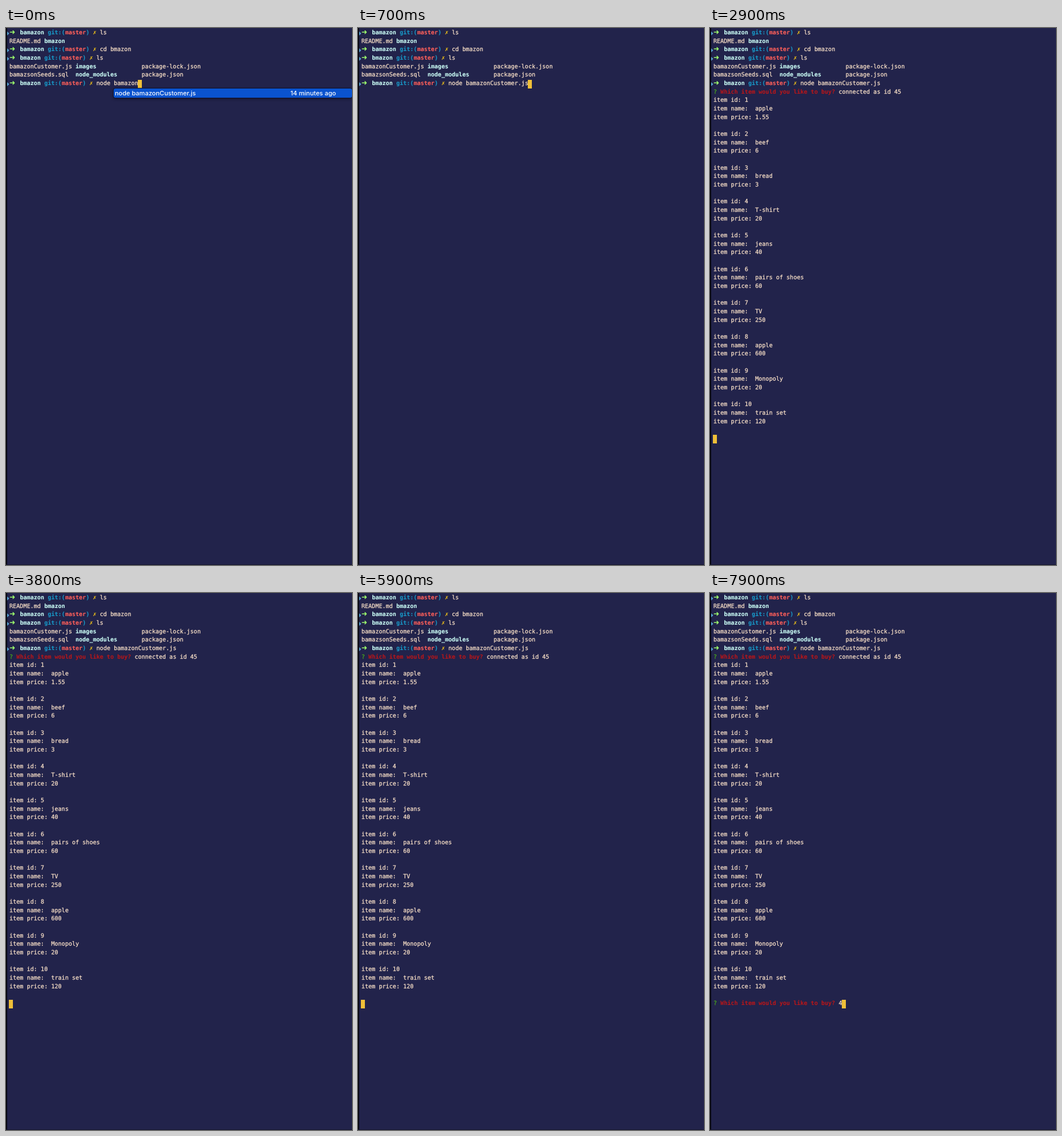
Recreate the animation shown at these times as an HTML page. Size 601 by 932 pixels, loop 8 s.

```html
<!DOCTYPE html>
<html lang="en">
<head>
<meta charset="utf-8">
<title>Terminal session</title>
<style>
html, body { margin: 0; width: 100%; height: 100%; overflow: hidden; background: #22234b; }
#stage { position: relative; width: 601px; height: 932px; overflow: hidden; background: #22234b; }
#stage > * { position: absolute; }
#edge { left: 0; top: 0; width: 1.5px; height: 932px; background: #05050f; }
#foot { left: 0; top: 931px; width: 601px; height: 1px; background: #15162f; }
.row {
  left: 6px; height: 14.667px; line-height: 14.667px; white-space: pre; color: #fbe2c9;
  font-family: "DejaVu Sans Mono", monospace; font-size: 10.04px;
  text-rendering: geometricPrecision; -webkit-text-stroke: .25px currentColor;
}
.row b { font-weight: 700; -webkit-text-stroke-width: .1px; }
.sym { display: inline-block; width: 1ch; line-height: 0; font-family: "DejaVu Sans", sans-serif; }
.arrow { color: #9eff6e; font-size: 12px; width: 6.04px; }
.dir { color: #c8faf4; }
.git { color: #1997c6; }
.branch { color: #fc5f5a; }
.dirty { color: #efc11a; font-family: "DejaVu Sans Mono", monospace; }
.mark { left: 1.5px; width: 4px; height: 8px; background: #58a6d6; clip-path: polygon(0 0, 100% 50%, 0 100%); }
.ok { color: #4ab118; }
.ask { color: #b5171b; }
#cursor { width: 7px; height: 15px; background: #efbf38; }
#popup {
  left: 187px; top: 105px; width: 414px; height: 16px; border-radius: 3px;
  box-shadow: 0 0 0 1px #10112a, 0 2px 5px rgba(0, 0, 0, .45);
  color: #fff; font: 500 11px/17px Inter, sans-serif; white-space: pre;
}
#popup span { position: absolute; top: 0; }
</style>
</head>
<body>
<div id="stage">
  <div id="edge"></div>
  <div id="foot"></div>
</div>
<script>
const LOOP = 8000, COL = 6.04, ROW = 14.667, LEFT = 5.6, TOP = 2;
const PICK = 600, ACCEPT = 700, ENTER = 2400, OUTPUT = 2900, TYPE = 6800;
const ANSWER_ROW = 48;
const stage = document.getElementById('stage');

function add(cls, html = '') {
  const el = document.createElement('div');
  el.className = cls;
  el.innerHTML = html;
  stage.append(el);
  return el;
}

function line(row, html) {
  const el = add('row', html);
  el.style.top = TOP + row * ROW + 'px';
  return el;
}

function shell(row, dir, command) {
  add('mark').style.top = TOP + row * ROW + 3.5 + 'px';
  return line(row,
    `<b class="sym arrow">➜</b>  <b class="dir">${dir}</b> <b class="git">git:(</b>` +
    `<b class="branch">master</b><b class="git">)</b> <b class="sym dirty">✗</b> <span>${command}</span>`);
}

const dir = name => `<b class="dir">${name}</b>`;
const question = '<span class="ok">?</span> <b class="ask">Which item would you like to buy?</b> ';

shell(0, 'bamazon', 'ls');
line(1, 'README.md ' + dir('bmazon'));
shell(2, 'bamazon', 'cd bmazon');
shell(3, 'bmazon', 'ls');
line(4, 'bamazonCustomer.js ' + dir('images') + ' '.repeat(13) + 'package-lock.json');
line(5, 'bamazsonSeeds.sql  ' + dir('node_modules') + ' '.repeat(7) + 'package.json');
const command = shell(6, 'bmazon', '').lastChild;

const items = [
  ['apple', '1.55'], ['beef', 6], ['bread', 3], ['T-shirt', 20], ['jeans', 40],
  ['pairs of shoes', 60], ['TV', 250], ['apple', 600], ['Monopoly', 20], ['train set', 120]
];
const output = [line(7, question + 'connected as id 45')];
items.forEach(([name, price], i) => {
  const row = 8 + i * 4;
  output.push(
    line(row, 'item id: ' + (i + 1)),
    line(row + 1, 'item name:  ' + name),
    line(row + 2, 'item price: ' + price));
});
const answer = line(ANSWER_ROW, question + '4');

const cursor = add('');
cursor.id = 'cursor';
const popup = add('',
  '<span style="left:2px">node bamazonCustomer.js</span><span style="left:307px">14 minutes ago</span>');
popup.id = 'popup';

const show = (el, on) => { el.style.visibility = on ? 'visible' : 'hidden'; };

function moveCursor(col, row) {
  cursor.style.left = Math.floor(LEFT + col * COL) + 'px';
  cursor.style.top = Math.floor(TOP + row * ROW) + 'px';
}

function render(t) {
  command.textContent = t < ACCEPT ? 'node bamazon' : 'node bamazonCustomer.js';

  show(popup, t < ACCEPT);
  popup.style.background = t < PICK ? '#0a53cf' : '#d9d8d9';
  popup.style.color = t < PICK ? '#fff' : 'transparent';

  output.forEach(el => show(el, t >= OUTPUT));
  show(answer, t >= TYPE);

  if (t < ENTER) moveCursor(25 + command.textContent.length, 6);
  else if (t < OUTPUT) moveCursor(0, 7);
  else moveCursor(t < TYPE ? 0 : 37, ANSWER_ROW);
}

const start = performance.now();
function tick() {
  render((performance.now() - start) % LOOP);
  requestAnimationFrame(tick);
}
tick();
</script>
</body>
</html>
```
